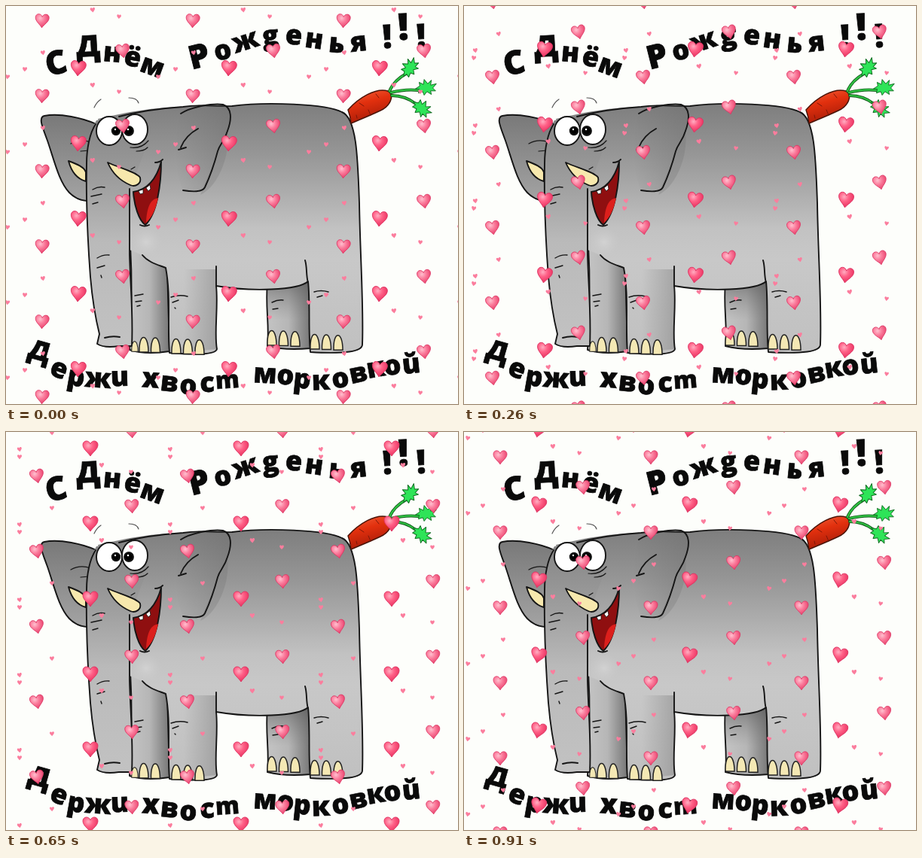
An HTML page that plays this animation: 600x529 px, repeating every 1040 ms.

```html
<!DOCTYPE html>
<html lang="ru">
<head>
<meta charset="utf-8">
<title>С Днём Рожденья</title>
<style>
html, body { margin: 0; width: 100%; height: 100%; overflow: hidden; background: #fdfefb; }
svg { display: block; width: 600px; height: 529px; }
text { font: 800 36px "Open Sans", "Noto Sans", sans-serif; text-anchor: middle; fill: #0a0a0a; stroke: #0a0a0a; stroke-width: .7; }
.ink { stroke: #151515; stroke-width: 1.9; stroke-linecap: round; stroke-linejoin: round; }
.line { fill: none; }
</style>
</head>
<body>
<svg viewBox="0 0 600 529">
<defs>
  <linearGradient id="skin" gradientUnits="userSpaceOnUse" x1="0" y1="130" x2="0" y2="462">
    <stop offset="0" stop-color="#7e7e7e"/><stop offset=".2" stop-color="#969696"/>
    <stop offset=".38" stop-color="#b0b0b0"/><stop offset=".5" stop-color="#c2c2c2"/>
    <stop offset=".62" stop-color="#c8c8c8"/><stop offset="1" stop-color="#c0c0c0"/>
  </linearGradient>
  <linearGradient id="trunk" gradientUnits="userSpaceOnUse" x1="0" y1="140" x2="0" y2="455">
    <stop offset="0" stop-color="#828282"/><stop offset=".3" stop-color="#9e9e9e"/>
    <stop offset=".55" stop-color="#bababa"/><stop offset="1" stop-color="#c2c2c2"/>
  </linearGradient>
  <linearGradient id="ear" gradientUnits="userSpaceOnUse" x1="0" y1="132" x2="0" y2="258">
    <stop offset="0" stop-color="#747474"/><stop offset="1" stop-color="#a3a3a3"/>
  </linearGradient>
  <linearGradient id="rim">
    <stop offset="0" stop-color="#666" stop-opacity="0"/><stop offset="1" stop-color="#666" stop-opacity=".35"/>
  </linearGradient>
  <linearGradient id="far">
    <stop offset="0" stop-color="#c4c4c4"/><stop offset=".5" stop-color="#b6b6b6"/>
    <stop offset="1" stop-color="#767676"/>
  </linearGradient>
  <linearGradient id="dark" x1="0" y1="0" x2="0" y2="1">
    <stop offset="0" stop-color="#555" stop-opacity=".6"/><stop offset=".6" stop-color="#777" stop-opacity="0"/>
  </linearGradient>
  <radialGradient id="glow">
    <stop offset="0" stop-color="#d2d2d2"/><stop offset="1" stop-color="#c8c8c8" stop-opacity="0"/>
  </radialGradient>
  <linearGradient id="carrot" x1="0" y1="0" x2=".35" y2="1">
    <stop offset="0" stop-color="#f0623a"/><stop offset=".45" stop-color="#e2300e"/>
    <stop offset="1" stop-color="#a81c08"/>
  </linearGradient>
  <radialGradient id="pink" cx=".36" cy=".3" r=".75">
    <stop offset="0" stop-color="#ffc0cf"/><stop offset=".4" stop-color="#fb7f9e"/>
    <stop offset="1" stop-color="#e63866"/>
  </radialGradient>
  <radialGradient id="rose" cx=".36" cy=".3" r=".75">
    <stop offset="0" stop-color="#ffadc1"/><stop offset=".4" stop-color="#ff6288"/>
    <stop offset="1" stop-color="#e62b5b"/>
  </radialGradient>
  <path id="heart" d="M0 11C-3 6-10 2-10-4C-10-10-2-11 0-5C2-11 10-10 10-4C10 2 3 6 0 11Z"/>
  <path id="toe" d="M-6 9C-7-17 6-17 6 9Z" fill="#f4e8b4" stroke="#222" stroke-width="1.5"/>
  <path id="leaf" d="M-14 1L-8-3L-9-8L-3-5L-2-12L3-6L8-11L7-4L15-6L10 0L14 4L7 4L8 9L2 5L-2 10L-4 5L-10 7L-9 2Z"/>
  <g id="tile"></g>
</defs>
<rect width="600" height="529" fill="#fdfefb"/>

<g class="ink">
  <!-- far ear and legs -->
  <path fill="url(#ear)" d="M120 157C102 149 72 142 51 146C42 148 49 162 55 179C64 205 70 233 84 248C92 256 100 259 109 259Z"/>
  <path class="line" stroke-width="1.2" d="M86 183C95 178 104 178 112 181M99 193L110 192"/>
  <path fill="url(#far)" d="M165 318C168 370 167 410 164 457Q185 464 217 459L214 346Z"/>
  <path fill="url(#far)" d="M347 368C344 400 350 425 347 452Q370 458 404 455L402 362Z"/>
  <path fill="url(#dark)" stroke="none" d="M347 374L402 366V452L349 450Z"/>
  <!-- body -->
  <path fill="url(#skin)" stroke="none" d="M122 150C165 140 195 135 235 134C265 130 280 134 300 133C345 127 425 130 446 141C466 149 467 205 469 262C470 330 475 400 473 450Q473 464 404 460C401 430 404 395 401 366C388 378 325 380 279 372C282 400 276 435 280 456Q278 466 217 461C214 420 219 385 212 348C202 344 189 341 181 331L164 324Z"/>
  <ellipse cx="186" cy="314" rx="22" ry="20" fill="url(#glow)" stroke="none"/>
  <path fill="url(#rim)" stroke="none" d="M236 350H279C282 400 276 435 280 456L236 460Z"/>
  <path class="line" d="M150 147C180 139 205 136 235 134C265 130 280 134 300 133C345 127 425 130 446 141C466 149 467 205 469 262C470 330 475 400 473 450Q473 464 404 460C401 430 404 395 401 366C388 378 325 380 279 372C282 400 276 435 280 456Q278 466 217 461C214 420 219 385 212 348C202 344 189 341 181 331M397 338C400 348 398 357 401 368M279 346V373"/>
  <!-- near ear -->
  <path fill="#666" fill-opacity=".22" stroke="none" d="M294 166C298 205 278 242 258 251L264 236Z"/>
  <path fill="url(#rim)" stroke="none" d="M232 143C245 134 275 129 288 131C300 135 300 150 294 166C290 180 284 183 281 193C276 212 272 224 264 241Q260 249 235 245C222 215 222 170 232 143Z"/>
  <path class="line" d="M232 143C245 134 275 129 288 131C300 135 300 150 294 166C290 180 284 183 281 193C276 212 272 224 264 241Q260 249 235 245M255 163C244 169 236 178 232 188M229 191L239 188"/>
  <!-- trunk -->
  <path fill="url(#trunk)" stroke="none" d="M120 152C112 164 107 185 107 210C106 270 109 320 112 360C115 395 120 420 124 436L121 449Q130 455 150 452L167 452C169 410 165 370 164 330V246L185 190L150 148Z"/>
  <path class="line" d="M119 157C111 169 107 190 107 210C106 270 109 320 112 360C115 395 120 420 124 436L121 449Q130 455 150 452L167 452C169 410 165 370 164 330V243M131 441Q141 438 151 440"/>
  <path class="line" stroke-width="1.4" d="M115 244Q123 239 131 241M113 253L127 250M115 263L122 261M121 335Q129 330 137 331M121 348L131 345M126 358L127 361M219 387Q230 383 241 386M221 394L229 391M224 401L225 402M353 394Q361 390 368 391M354 403L361 402M409 380Q418 377 428 380M413 387L420 385M171 385L182 383M172 393L180 392M174 399L178 398"/>
  <!-- mouth -->
  <path fill="#8f0f10" d="M206 207C206 235 201 276 185 291C176 285 170 264 169 247C188 244 200 229 206 207Z"/>
  <path fill="#dc1f1c" stroke="none" d="M199 256C192 258 187 267 186 288C194 281 199 270 202 255Z"/>
  <path fill="#fff" stroke-width=".8" d="M176 246L178 250L182 249V244ZM186 242L189 246L192 243L191 238Z"/>
  <path class="line" d="M198 208Q204 208 208 204M178 291Q184 294 190 291"/>
  <!-- tusks -->
  <path fill="#f7e8ad" d="M135 208C150 215 174 221 178 228C180 236 172 241 165 238C151 232 141 222 135 208ZM83 206C94 210 104 214 106 221V233C95 230 87 221 83 206Z"/>
  <!-- eyes -->
  <ellipse cx="137" cy="166" rx="17" ry="19" fill="#fff"/>
  <ellipse cx="171" cy="164" rx="17" ry="20" fill="#fff"/>
  <circle cx="146" cy="166" r="5.3"/>
  <circle cx="163" cy="166" r="6"/>
  <circle cx="145" cy="164" r="1.2" fill="#fff" stroke="none"/>
  <circle cx="162" cy="164" r="1.3" fill="#fff" stroke="none"/>
  <path class="line" stroke="#555" stroke-width="1.2" d="M117 135Q120 128 126 124M163 122Q174 122 176 129"/>
  <path class="line" stroke-width="1.2" d="M165 188Q180 190 189 179M173 193Q183 193 188 188M166 217L171 214"/>
  <!-- carrot -->
  <path fill="url(#carrot)" stroke="#4a1408" stroke-width="1.5" d="M454 138C468 122 491 108 507 113C517 119 509 134 497 139C480 147 467 152 458 156Q457 146 454 138Z"/>
  <path class="line" stroke="#7d1708" stroke-width="1" d="M469 129L475 133M484 145L481 138M491 117L495 122M466 149L465 145"/>
  <g class="line">
    <path stroke="#145c1c" stroke-width="4" d="M509 113Q515 99 531 90M511 115Q530 110 548 112M512 119Q530 119 544 130"/>
    <path stroke="#2fc343" stroke-width="2.2" d="M509 113Q515 99 531 90M511 115Q530 110 548 112M512 119Q530 119 544 130"/>
  </g>
  <g fill="#2ee458" stroke="#116b20" stroke-width="1">
    <use href="#leaf" transform="translate(536 83) rotate(-48) scale(.95)"/>
    <use href="#leaf" transform="translate(557 109) scale(.95)"/>
    <use href="#leaf" transform="translate(551 136) rotate(44) scale(.95)"/>
  </g>
</g>
<g id="toes"></g>
<g id="words"></g>
<g id="hearts"></g>
</svg>
<script>
const NS = 'http://www.w3.org/2000/svg';
const byId = id => document.getElementById(id);

function add(parent, tag, attrs, text) {
  const el = document.createElementNS(NS, tag);
  for (const key in attrs) el.setAttribute(key, attrs[key]);
  if (text) el.textContent = text;
  parent.append(el);
  return el;
}

// Toes: first x, y, count per foot
for (const [x, y, n] of [[183, 451, 2], [226, 453, 3], [353, 442, 3], [410, 447, 3]]) {
  for (let i = 0; i < n; i++) {
    add(byId('toes'), 'use', { href: '#toe', x: x + i * 15.5, y: y + i * 0.6 });
  }
}
add(byId('toes'), 'use', { href: '#toe', transform: 'translate(171 453) scale(.7)' });

// Letter, centre x, centre y, turn, optional scale
const greeting = [
  ['С', 66, 75, -14, 1.2], ['Д', 109, 53, -3, 1.08], ['н', 141, 64, 5], ['ё', 168, 70, 10], ['м', 194, 82, 20],
  ['Р', 256, 66, -14, 1.2], ['о', 288, 61, -12], ['ж', 318, 48, -18], ['g', 351, 42, -6], ['е', 382, 41, 4],
  ['н', 409, 46, 8], ['ь', 439, 52, 6], ['я', 468, 50, -6],
  ['!', 506, 40, -3, 1.2], ['!', 527, 27, -3, 1.35], ['!', 551, 39, -3, 1.2]
];
const wish = [
  ['Д', 45, 458, 16, .98], ['е', 70, 484, 20], ['р', 93, 495, 10], ['ж', 122, 497, 4], ['u', 151, 495, -2],
  ['х', 192, 497, 4], ['в', 217, 502, 6], ['о', 242, 506, 4], ['с', 267, 503, -2], ['m', 294, 499, -4, .88],
  ['м', 344, 491, 3], ['о', 371, 493, 6], ['р', 393, 498, 6], ['к', 418, 500, -2], ['о', 444, 497, -8],
  ['в', 468, 490, -12], ['к', 491, 483, -10], ['о', 513, 480, -8], ['ŭ', 538, 478, -6]
];
for (const [ch, x, y, turn, size = 1] of [...greeting, ...wish]) {
  add(byId('words'), 'text', {
    y: /[СДР!]/.test(ch) ? 13 : 10,
    transform: `translate(${x} ${y}) rotate(${turn}) scale(${size})`
  }, ch);
}

// Sideways sway and tilt of the three drifting streams
const STEP = 130, STEPS = 8, RISE = 12.3;
const streams = {
  a: { x: [48, 42, 38, 36, 38, 41, 45, 48], tilt: [3, -3, -8, -12, -12, -10, -5, 0] },
  b: { x: [155, 152, 152, 157, 163, 167, 164, 158], tilt: [-8, -10, -12, -12, -8, -4, -4, -6] },
  c: { x: [96, 102, 107, 110, 112, 112, 106, 99], tilt: [5, 14, 8, 4, 2, 0, 6, 12] }
};
const hearts = [
  { s: 'a', dx: 0, y: 19, size: .9, fill: 'url(#pink)' },
  { s: 'b', dx: 0, y: 59, size: .9, fill: 'url(#pink)' },
  { s: 'c', dx: 0, y: 82, size: 1, fill: 'url(#rose)' },
  { s: 'c', dx: -94, y: 94, size: .3 },
  { s: 'a', dx: -23, y: 84, size: .3 },
  { s: 'b', dx: -106, y: 62, size: .3 },
  { s: 'b', dx: -40, y: 105, size: .32 },
  { s: 'c', dx: 54, y: 114, size: .28 }
];
for (const h of hearts) {
  h.el = add(byId('tile'), 'use', { href: '#heart', fill: h.fill || '#fb7d9d' });
  if (h.fill) {
    h.el.setAttribute('stroke', '#dd3563');
    h.el.setAttribute('stroke-width', 0.9);
  }
}
for (let x = -200; x <= 600; x += 200) {
  for (let y = -100; y <= 600; y += 100) add(byId('hearts'), 'use', { href: '#tile', x, y });
}

let last = -1;
function draw(ms) {
  const k = Math.floor(ms / STEP) % STEPS;
  if (k === last) return;
  last = k;
  for (const h of hearts) {
    const { x, tilt } = streams[h.s];
    const y = Math.round(h.y - RISE * k);
    h.el.setAttribute('transform',
      `translate(${x[k] + h.dx} ${y}) rotate(${tilt[k]}) scale(${h.size})`);
  }
}

const start = performance.now();
function tick() {
  draw(performance.now() - start);
  requestAnimationFrame(tick);
}
draw(0);
requestAnimationFrame(tick);
</script>
</body>
</html>
```
